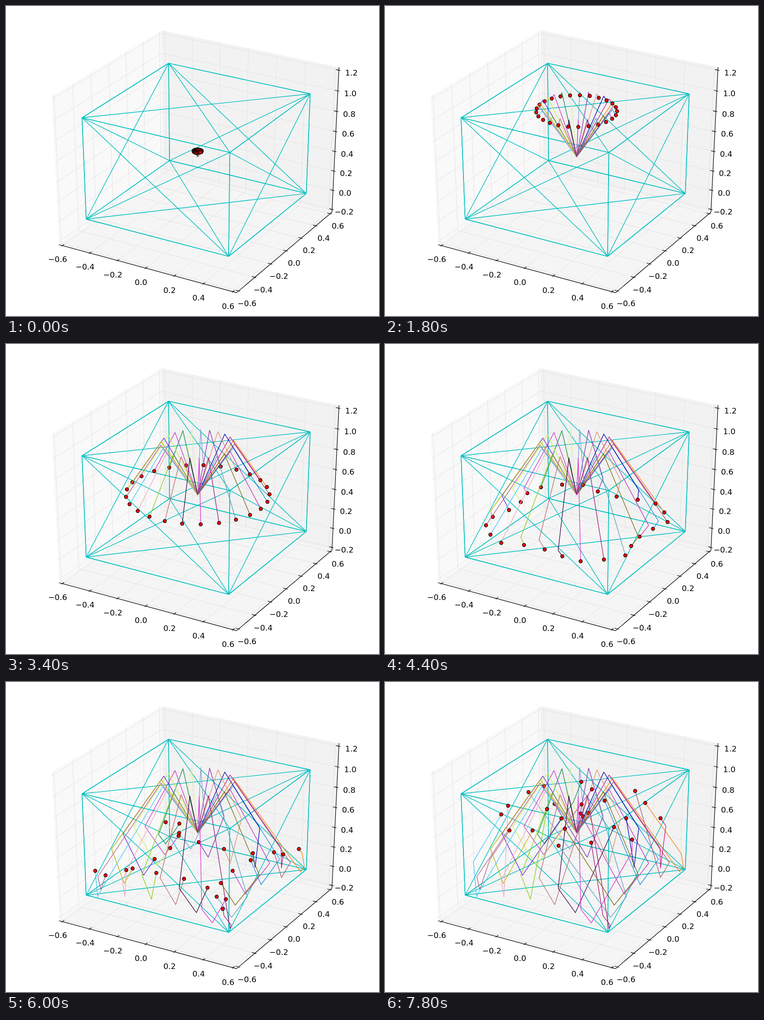
These frames come from a looping animation (794 px wide and 660 px high, 8 s). An HTML page:

```html
<!DOCTYPE html>
<html lang="en">
<head>
<meta charset="utf-8">
<title>Bouncing particles in a box</title>
<style>
  html, body { margin: 0; width: 100%; height: 100%; overflow: hidden; background: #fff; }
  svg { display: block; width: 100vw; height: 100vh; }
  path { fill: none; }
  text { font: 16.67px "DejaVu Sans", Verdana, sans-serif; text-anchor: middle; }
  .grid { stroke: #e3e3e3; stroke-width: 1; }
  .axis { stroke: #000; stroke-width: 1.2; }
  .box { stroke: #00bfbf; stroke-width: 1.39; }
  .trace { stroke-width: 1.3; stroke-linejoin: round; }
  .dot { fill: #f00; stroke: #000; stroke-width: 1.2; }
</style>
</head>
<body>
<svg id="stage" viewBox="0 0 794 660"></svg>
<script>
const stage = document.getElementById('stage');
const STEP_MS = 200, STEPS = 40;
const DR = 0.0243, DZ = 0.055;          // speed per step, outward and upward
const EDGE = 0.5 + 1 / 48;              // pane edge in the centred unit cube
const LABEL = 0.568;                    // label distance from the centre
const COLORS = ['#c030c0', '#1e88e5', '#a8566a', '#f58410', '#c01590',
  '#0000b0', '#e09070', '#8a30b0', '#7f9cd0', '#e0f0a0',
  '#189048', '#cc33cc', '#d0ee50', '#7020d8', '#b4b400',
  '#b06080', '#40c8f8', '#f0a8b8', '#88d018', '#c06868',
  '#400840', '#e030d0', '#a01878', '#58a0b8', '#786808'];

function add(tag, attrs, text) {
  const node = document.createElementNS('http://www.w3.org/2000/svg', tag);
  for (const key in attrs) node.setAttribute(key, attrs[key]);
  if (text) node.textContent = text;
  return stage.appendChild(node);
}

// Perspective view, elevation 30 degrees, azimuth -60 degrees, distance 10.
function project([x, y, z]) {
  const h = Math.sqrt(3) / 2;
  const depth = 10 - (h / 2 * x - 0.75 * y + z / 2);
  return [
    408 + 4189 * (h * x + y / 2) / depth,
    321 - 3459 * (-x / 4 + h / 2 * y + h * z) / depth
  ];
}

const pathOf = points => 'M' + points.map(p => project(p).map(v => v.toFixed(2))).join('L');
const line = (cls, ...points) => add('path', { class: cls, d: pathOf(points) });

// Box coordinates run from 0 to 1 on every axis.
const fromBox = ([x, y, z]) => [(x - 0.5) / 1.2, (y - 0.5) / 1.2, (z - 0.5) / 1.4];

function drawPanes() {
  const e = EDGE;
  const pane = (fill, ...points) => add('path', { d: pathOf(points) + 'Z', style: 'fill:' + fill });
  pane('#f9f9f9', [-e, -e, -e], [-e, e, -e], [-e, e, e], [-e, -e, e]);
  pane('#f2f2f2', [-e, e, -e], [e, e, -e], [e, e, e], [-e, e, e]);
  pane('#f5f5f5', [-e, -e, -e], [e, -e, -e], [e, e, -e], [-e, e, -e]);
}

function drawAxes() {
  const e = EDGE, out = e + 1 / 120, inner = e - 1 / 60;
  const axes = [
    { count: 7, first: -0.6,
      grid: t => [[t, -e, -e], [t, e, -e], [t, e, e]],
      at: (t, side, low) => [t, -side, -low] },
    { count: 7, first: -0.6,
      grid: t => [[e, t, -e], [-e, t, -e], [-e, t, e]],
      at: (t, side, low) => [side, t, -low] },
    { count: 8, first: -0.2,
      grid: t => [[-e, -e, t], [-e, e, t], [e, e, t]],
      at: (t, side, low) => [side, low, t] }
  ];
  const eachTick = (axis, draw) => {
    for (let i = 0; i < axis.count; i++) draw(i / (axis.count - 1) - 0.5, axis.first + i * 0.2);
  };
  for (const axis of axes) eachTick(axis, t => line('grid', ...axis.grid(t)));
  for (const axis of axes) {
    line('axis', axis.at(-e, e, e), axis.at(e, e, e));
    eachTick(axis, (t, value) => {
      line('axis', axis.at(t, out, e), axis.at(t, inner, e));
      const [x, y] = project(axis.at(t, LABEL, LABEL));
      const label = (value < -0.01 ? '\u2212' : '') + Math.abs(value).toFixed(1);
      add('text', { x, y: y + 14 }, label);
    });
  }
}

// Face diagonals once, edges twice because neighbouring faces share them.
function drawBox() {
  const corner = n => fromBox([n & 1, n >> 1 & 1, n >> 2]);
  for (let a = 0; a < 8; a++) {
    for (let b = a + 1; b < 8; b++) {
      const differing = [1, 2, 4].filter(bit => (a ^ b) & bit).length;
      for (let k = differing; k < 3; k++) line('box', corner(a), corner(b));
    }
  }
}

function fold(u) {
  const m = ((u % 2) + 2) % 2;
  return m > 1 ? 2 - m : m;
}

function makeParticle(color, i) {
  const angle = 2 * Math.PI * i / COLORS.length;
  const velocity = [DR * Math.cos(angle), DR * Math.sin(angle), DZ];
  const at = t => fromBox(velocity.map(v => fold(0.5 + v * t)));
  const hits = [];
  for (const v of velocity) {
    for (let t = 0.5 / Math.abs(v); t < STEPS; t += 1 / Math.abs(v)) hits.push(t);
  }
  hits.sort((a, b) => a - b);
  const trace = add('path', { class: 'trace', stroke: color });
  const dot = add('circle', { class: 'dot', r: 3.6 });
  return step => {
    const times = [0, ...hits.filter(t => t < step), step];
    trace.setAttribute('d', pathOf(times.map(at)));
    const [x, y] = project(at(step));
    dot.setAttribute('cx', Math.round(x * 2) / 2);
    dot.setAttribute('cy', Math.round(y * 2) / 2);
  };
}

drawPanes();
drawAxes();
drawBox();
const particles = COLORS.map(makeParticle);

const start = performance.now();
let shown = 0;
function frame() {
  const elapsed = Math.max(0, performance.now() - start);
  const step = Math.floor(elapsed / STEP_MS) % STEPS + 1;
  if (step !== shown) {
    particles.forEach(move => move(step));
    shown = step;
  }
  requestAnimationFrame(frame);
}
frame();
</script>
</body>
</html>
```
